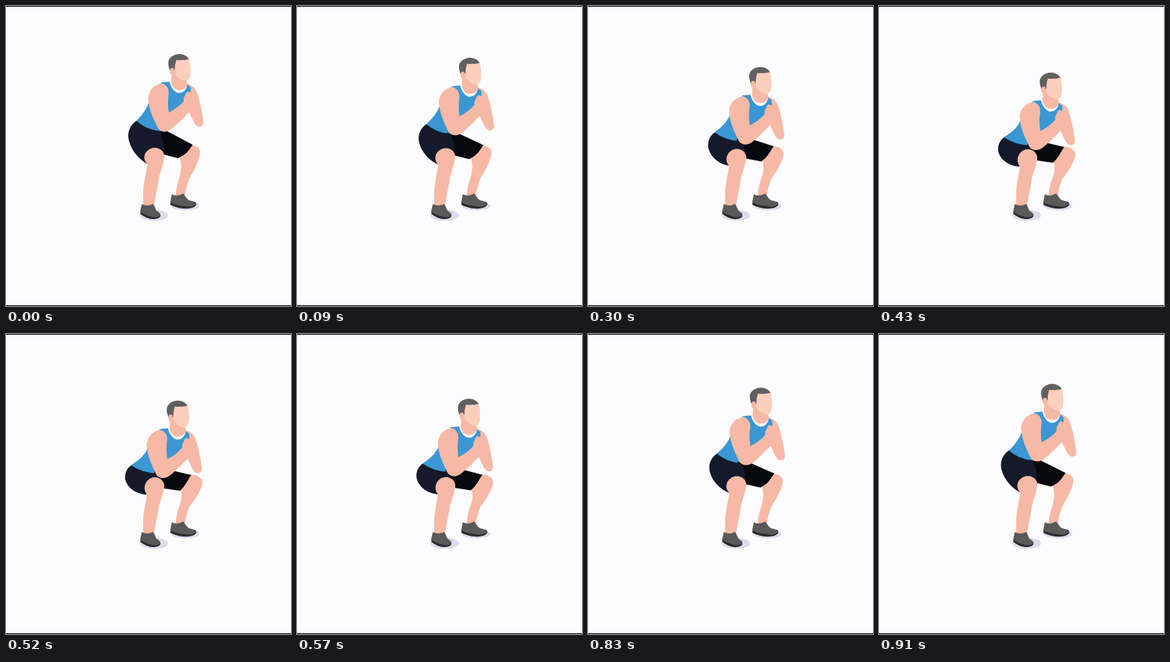
Recreate the animation shown at these times as an HTML page. Size 380 px wide and 400 px high, loop 950 ms.

```html
<!DOCTYPE html>
<html lang="en">
<head>
<meta charset="utf-8">
<title>Squat</title>
<style>
  html, body { margin: 0; width: 100%; height: 100%; overflow: hidden; background: #fcfcfe; }
  svg { display: block; width: 380px; height: 400px; }
  .skin { fill: #f6b9a5; }
  .face { fill: #fbcfbc; }
  .hair { fill: #625f61; }
  .tank { fill: #3a97d3; }
  .near { fill: #151a2a; }
  .far { fill: #08090f; }
  .shoe { fill: #5a5859; }
  .sole { fill: #2b2a2e; }
  .shade { fill: #dcdcec; }
</style>
</head>
<body>
<svg viewBox="0 0 380 400">
  <rect width="380" height="400" fill="#fcfcfe"/>
  <path d="M0 0H380V1H0ZM0 399H380V400H0Z" fill="#111"/>

  <ellipse class="shade" cx="239" cy="267" rx="19" ry="5.5"/>
  <ellipse class="shade" cx="197" cy="279" rx="19" ry="7.5"/>

  <!-- A pair "a>b" in data-d runs from the high pose to the low pose -->
  <path class="skin" data-d="M240>240 186>188 C249>250 184>186 258>260 187>189 259>262 194>197
    C258>261 208>209 248>249 223>225 244 231 Q240 242 238 254 L226 254 Q227 242 230 233
    C233>233 224>225 235>236 213>217 232>233 203>208Z"/>
  <path class="sole" d="M220 259 L219 265 C225 268 234 271 243 270 Q253 269 254 264 L252 261Z"/>
  <path class="shoe" d="M221 251 Q228 255 236 250 C239 252 240 257 244 259 Q251 260 253 264 Q249 269 239 267 Q227 266 219 262Z"/>

  <g class="up">
    <path class="skin" d="M241 104 C249 105 254 111 256 119 C259 129 262 143 263 153 Q264 161 257 161 Q253 160 250 154 L242 137Z"/>
    <path class="tank" data-d="M207 102 L218 101 C220 109 225 116 231 116 Q239 116 242 105 L246 108 C248 117 242 128 240 137
      L224 157 Q214 169>165 205 168>164 Q185>181 166>162 174>169 153>150 Q187 140>139 191 127Z"/>
    <path class="skin" d="M221 84 L220 102 C222 109 227 113 232 112 Q240 112 242 103 L239 96Z"/>
    <path class="face" d="M225 71 L244 70 C246 79 247 88 245 95 Q243 101 236 99 Q228 96 225 90Z"/>
    <path class="hair" d="M219 87 C216 80 215 73 219 69 Q224 64 232 64 Q241 65 244 71 Q235 73 227 72 Q225 78 225 86Z"/>
    <ellipse class="skin" cx="221.5" cy="87" rx="3" ry="4.5"/>
  </g>

  <path class="far" data-d="M200>198 166>181 Q208>207 168>183 215>213 167>180 L249>247 185>188
    C244>243 191>193 243>240 197>202 229>232 203>209 L211>211 198>206 L198>198 192>194Z"/>
  <path class="near" data-d="M174>167 153>175 Q185>180 164>185 205>203 167>186
    Q211>210 180>191 211>210 199>205 L198>198 202>205 L189>188 211>214
    C178>175 205>214 168>162 194>206 164>159 180>194 C161>158 169>186 165>161 159>179 174>167 153>175Z"/>
  <path class="skin" data-d="M189>188 211>214 C180>181 204>206 185>186 190>192 198 189>191
    C207 189>191 212>212 196>198 211 202>205 C209>209 214>216 204 225 203 236 Q200 251 197 267
    L183 267 Q182 245 185 231 Q187 219>221 189>188 211>214Z"/>
  <path class="sole" d="M180 270 L179 277 C184 281 191 285 199 284 Q206 283 206 279 L203 276Z"/>
  <path class="shoe" d="M181 264 Q188 268 196 264 C199 267 199 272 202 274 Q206 276 206 279 Q202 283 194 281 Q185 279 179 274Z"/>

  <g class="up">
    <path class="skin" d="M208 103 C196 105 188 115 190 127 C191 139 197 151 202 162 C205 168 213 169 219 165
      C229 158 238 147 247 139 Q256 135 257 125 Q256 117 250 117 L243 114 Q240 114 239 119
      Q236 122 237 127 Q229 136 217 142 Q215 128 217 116 Q217 106 208 103Z"/>
  </g>
</svg>
<script>
  const LOOP = 950, FPS = 23, TURN = 11;
  const groups = [...document.querySelectorAll('.up')];
  const morphs = [...document.querySelectorAll('[data-d]')];

  function pose(p) {
    for (const g of groups) g.setAttribute('transform', `translate(${-2 * p} ${24.7 * p})`);
    for (const m of morphs) {
      m.setAttribute('d', m.dataset.d.replace(/([\d.]+)>([\d.]+)/g,
        (_, a, b) => (+a + (b - a) * p).toFixed(2)));
    }
  }

  // Even steps at 23 per second, held on a 10 ms clock
  function draw(now) {
    const tick = Math.floor((now % LOOP) / 10);
    const step = Math.floor((tick + 0.5) * FPS / 100);
    pose((TURN - Math.abs(step - TURN)) / 10);
  }

  const start = performance.now();
  function loop() {
    draw(performance.now() - start);
    requestAnimationFrame(loop);
  }
  loop();
</script>
</body>
</html>
```
